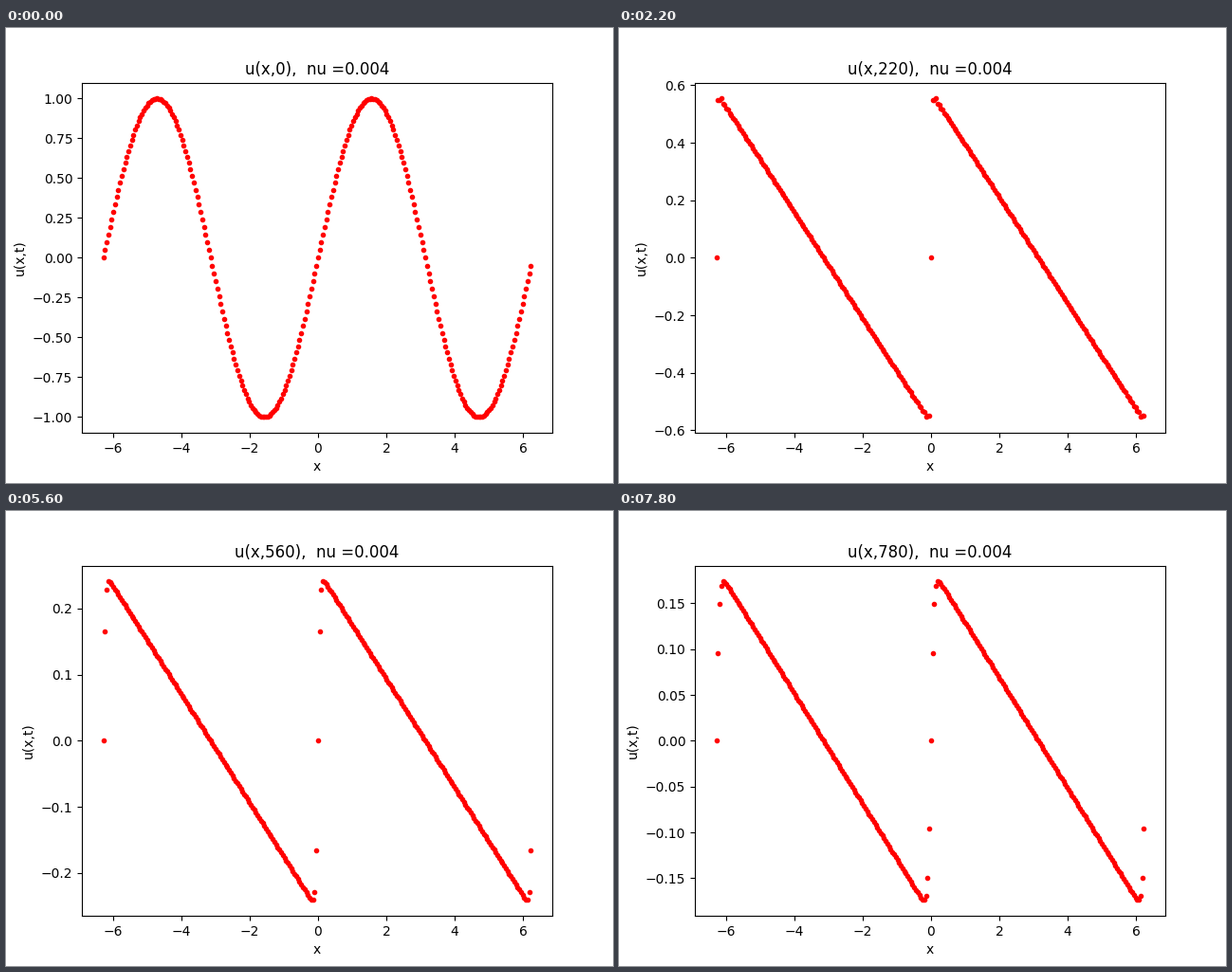
Animation, 640 px wide and 480 px high, one loop 8 s. Source, as a matplotlib script:

```python
import numpy as np
import matplotlib.pyplot as plt
from matplotlib.animation import FuncAnimation

NU = 0.004
N = 128               # grid points in one period of 2*pi
FRAMES = 40
STEPS_PER_FRAME = 20  # counter advance per frame
DT = 0.01             # integrator step, two per counter tick

k = np.arange(N // 2 + 1)
x = -2 * np.pi + 2 * np.pi / N * np.arange(2 * N)


def rhs(u):
    """Burgers equation with pseudo-spectral derivatives."""
    u_hat = np.fft.rfft(u)
    u_x = np.fft.irfft(1j * k * u_hat, N)
    u_xx = np.fft.irfft(-k**2 * u_hat, N)
    return u * u_x + 2 * NU * u_xx


def rk4(u):
    a = rhs(u)
    b = rhs(u + DT / 2 * a)
    c = rhs(u + DT / 2 * b)
    d = rhs(u + DT * c)
    return u + DT / 6 * (a + 2 * b + 2 * c + d)


def solve():
    u = np.sin(x[:N])
    states = [u]
    for _ in range(FRAMES - 1):
        for _ in range(2 * STEPS_PER_FRAME):
            u = rk4(u)
        states.append(u)
    return [np.tile(s, 2) for s in states]


waves = solve()

plt.rcParams["font.family"] = "DejaVu Sans"
fig, ax = plt.subplots(figsize=(6.4, 4.8), dpi=100)
line, = ax.plot(x, waves[0], "r.")
ax.set_xlabel("x")
ax.set_ylabel("u(x,t)")


def update(i):
    line.set_ydata(waves[i])
    ax.relim()
    ax.autoscale_view()
    ax.set_title(f"u(x,{i * STEPS_PER_FRAME}),  nu ={NU}")
    return line,


anim = FuncAnimation(fig, update, frames=FRAMES, init_func=lambda: update(0),
                     interval=200, repeat=True, repeat_delay=0, blit=False)
plt.show()
```
